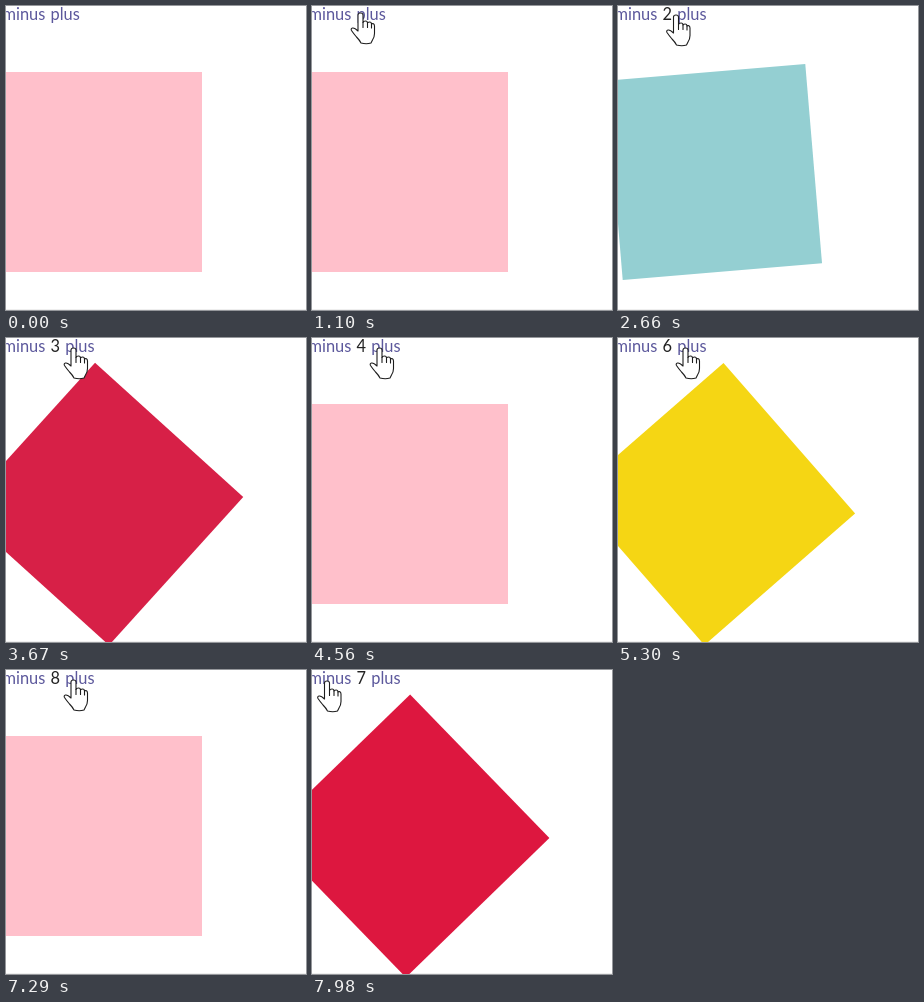
Animation of 300x304 px, one loop 8 s. Source, as an HTML page:

```html
<!DOCTYPE html>
<html lang="en">
<head>
<meta charset="utf-8">
<title>Counter with turning square</title>
<style>
  html, body { margin: 0; width: 100%; height: 100%; overflow: hidden; background: #fff; }
  svg { display: block; width: 100%; height: 100%; }
  text { font: 16.4px Lato, "Open Sans", sans-serif; word-spacing: 1px; fill: #5c589c; }
  #count { fill: #222; }
  .pointer { fill: #fff; stroke: #1c1c1c; stroke-width: 1.1; stroke-linejoin: round; stroke-linecap: round; }
</style>
</head>
<body>
<svg viewBox="0 0 300 304">
  <path d="M0 303.5H300" stroke="#eee"/>
  <text x="-3.5" y="14">minus <tspan id="count"></tspan>plus</text>
  <rect id="box" x="-4" y="66" width="200" height="200"/>
  <g id="cursor" class="pointer">
    <path id="arrow" d="M0 0V16L4 12.5L6.5 18L9 17L6.5 11.5H11.5Z"/>
    <g id="hand">
      <path d="M-2.5 18V2Q-2.5 0 0 0T2.5 2V9.5Q3 8 5 8T7 10Q7 9 9 9T11 11Q11 10.5 12.5 10.5Q14 11 14 13V20.5Q14 24 12 27L10.5 30Q6 31.5 .5 30Q-1 27-4 24Q-7 20.5-9 17.5Q-10 15.5-8 15Q-6 14.5-2.5 18Z"/>
      <path d="M2.5 9.5V14.5M7 10V14.5M11 11V15" fill="none"/>
    </g>
  </g>
</svg>
<script>
const LOOP = 8000, TURN = 500, MAX = 8, MINUS_AT = 7570;
const colors = ['pink', 'gold', 'skyblue', 'crimson'];

const $ = id => document.getElementById(id);
const clamp = v => Math.min(1, Math.max(0, v));
const mix = (a, b, p) => a + (b - a) * p;
const smooth = p => p * p * (3 - 2 * p);
const cubic = (a, b, s) => 3 * a * s * (1 - s) ** 2 + 3 * b * s * s * (1 - s) + s ** 3;

// CSS "ease": cubic-bezier(.25, .1, .25, 1)
function ease(x) {
  let lo = 0, hi = 1;
  for (let i = 0; i < 20; i++) {
    const mid = (lo + hi) / 2;
    if (cubic(.25, .25, mid) < x) lo = mid; else hi = mid;
  }
  return cubic(.1, 1, hi);
}

// plus is pressed slowly up to three, then at a quicker pace
const plusAt = n => 3325 + (n - 3) * (n < 3 ? 970 : 643);

function stateAt(t) {
  if (t >= MINUS_AT) return { from: MAX, to: MAX - 1, start: MINUS_AT };
  let n = 0;
  while (n < MAX && plusAt(n + 1) <= t) n++;
  return n ? { from: n - 1, to: n, start: plusAt(n) } : { from: 0, to: 0, start: 0 };
}

function drawBox(t) {
  const { from, to, start } = stateAt(t);
  const p = ease(clamp((t - start) / TURN));
  const [a, b] = [from, to].map(n => colors[n % colors.length]);
  $('box').setAttribute('transform', `rotate(${mix(from, to, p) * 45} 96 166)`);
  $('box').style.fill = `color-mix(in srgb, ${a}, ${b} ${(p * 100).toFixed(2)}%)`;
  $('count').textContent = to ? to + ' ' : '';
}

function drawCursor(t) {
  let x = 302, y = 178;
  const glide = (start, end, toX, toY) => {
    const p = smooth(clamp((t - start) / (end - start)));
    x = mix(x, toX, p);
    y = mix(y, toY, p);
  };
  glide(350, 1100, 48.5, 7);
  glide(2030, 2340, 58, 9);
  glide(2930, 3300, 67.5, 10);
  glide(7290, 7540, 15, 11);

  const overText = x < 76 && y < 20;
  $('cursor').setAttribute('transform', `translate(${x} ${y})`);
  $('cursor').style.display = t < 350 ? 'none' : '';
  $('hand').style.display = overText ? '' : 'none';
  $('arrow').style.display = overText ? 'none' : '';
}

const begin = performance.now();
function frame() {
  const t = (performance.now() - begin) % LOOP;
  drawBox(t);
  drawCursor(t);
  requestAnimationFrame(frame);
}
frame();
</script>
</body>
</html>
```
